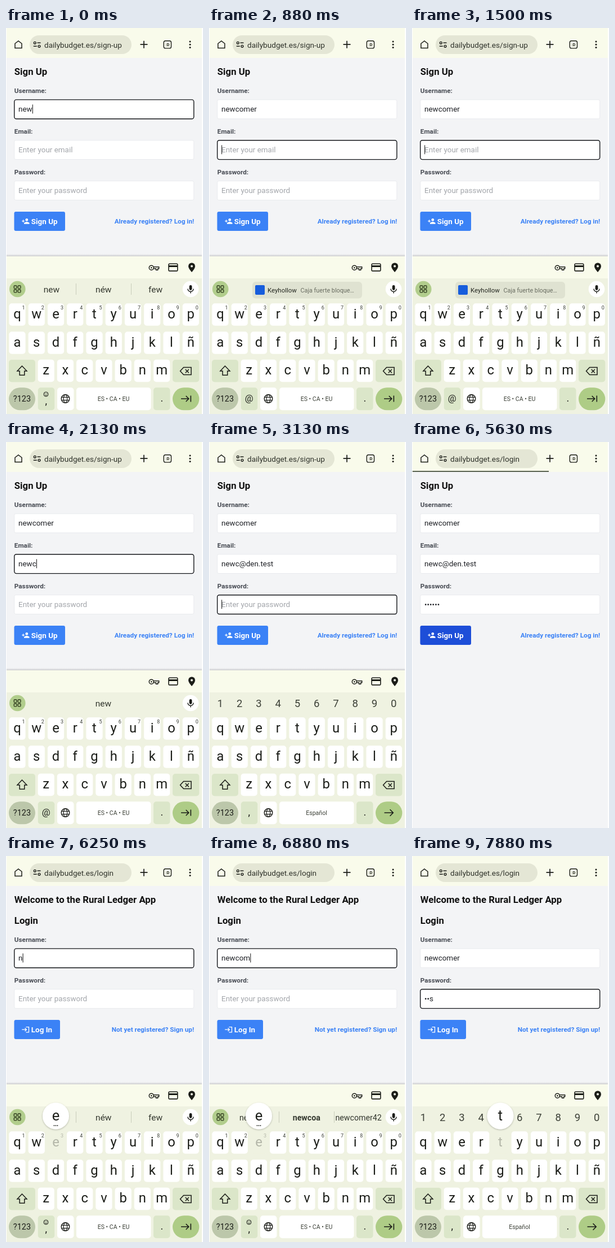
Write an HTML page that moves like this. It is 350 by 683 pixels and loops after 8 s.

```html
<!DOCTYPE html>
<html lang="en">
<head>
<meta charset="utf-8">
<title>Sign up and log in</title>
<style>
html, body { margin: 0; width: 100%; height: 100%; overflow: hidden; background: #fff; }
svg { display: block; width: 350px; height: 683px; font-family: Roboto, sans-serif; }
text { white-space: pre; }
</style>
</head>
<body>
<svg id="stage" viewBox="0 0 350 683"></svg>
<script>
const LOOP = 8000;
const INK = '#1b1d18', BAR = '#f9fbeb', BOARD = '#eff2e1', SOFT = '#dbe6c9', BLUE = '#3b82f6';
const NAME = 'newcomer', MAIL = 'newc@den.test', PASS = 'tester';

// Ticks (1/8 s) at which each character lands
const TYPED = {
  name: [-2, -1, 0, 2, 3, 4, 5, 6],
  mail: [14, 15, 16, 17, 18, 19, 20, 20, 21, 21, 22, 22, 23],
  pass: [30, 31, 32, 33, 35, 37],
  loginName: [50, 51, 52, 53, 54, 55, 56, 57],
  loginPass: [61, 62, 63, 64, 65, 66]
};
const KEYBOARD_DROP = { 39: 140, 49: 160 };
const CARET_OFF = [10, 11, 63];
const ROWS = [['qwertyuiop', 20, 507], ['asdfghjklñ', 20, 557], ['zxcvbnm', 71.2, 606.5]];
const PITCH = 34.25;

const stage = document.getElementById('stage');
const pen = document.createElement('canvas').getContext('2d');
const width = (s, size) => {
  pen.font = `${size}px Roboto, sans-serif`;
  return pen.measureText(s).width;
};

const rect = (x, y, w, h, fill, r = 0, extra = '') =>
  `<rect x="${x}" y="${y}" width="${w}" height="${h}" rx="${r}" fill="${fill}" ${extra}/>`;
const disc = (x, y, r, fill, extra = '') =>
  `<circle cx="${x}" cy="${y}" r="${r}" fill="${fill}" ${extra}/>`;
const ring = (x, y, r, w = 1.5, color = INK) =>
  disc(x, y, r, 'none', `stroke="${color}" stroke-width="${w}"`);
const line = (d, w = 1.6, color = INK) =>
  `<path d="${d}" fill="none" stroke="${color}" stroke-width="${w}"/>`;
const text = (x, y, s, size, fill = INK, { weight = 400, anchor = 'start' } = {}) =>
  `<text x="${x}" y="${y}" font-size="${size}" font-weight="${weight}" fill="${fill}" text-anchor="${anchor}">${s}</text>`;
const mid = (x, y, s, size, fill = INK, weight = 400) =>
  text(x, y, s, size, fill, { weight, anchor: 'middle' });
const bold = (x, y, s, size, fill, anchor = 'start') =>
  text(x, y, s, size, fill, { weight: 600, anchor });

function browserBar(url, progress) {
  return rect(1, 0, 347, 53, BAR)
    + line('M16 27.5 22 23 28 27.5V35.5H16Z', 1.5)
    + rect(42, 13, 181, 33, '#e4e6d5', 16.5)
    + ring(51.3, 26.3, 1.9, 1.4) + line('M55.5 26.3H61.5M48.8 32.3H54.8', 1.4) + ring(59, 32.3, 1.9, 1.4)
    + text(68, 34.5, 'dailybudget.es/' + url, 13.6, '#30332b')
    + line('M238.5 29.2H251.5M245 22.7V35.7', 1.7)
    + rect(280.3, 22.7, 13.2, 13.2, 'none', 3, `stroke="${INK}" stroke-width="1.4"`)
    + mid(287, 31.8, ':D', 7, INK, 700)
    + [24, 29.2, 34.4].map(y => disc(327, y, 1.5, INK)).join('')
    + (progress ? rect(1, 51, progress - 1, 2, '#5a6350') : '');
}

function field(y, label, value, hint, focused, caret) {
  const frame = focused ? 'stroke="#15171b" stroke-width="1.4"' : 'stroke="#e9ebee" stroke-width="1"';
  const base = y + 21.5;
  return bold(14.8, y - 11.8, label, 11.76, '#474b53')
    + rect(14.8, y, 318.9, 33.8, '#fff', focused ? 3.5 : 2.5, frame)
    + (value ? text(22, base, value, 13.44, '#1f2126') : text(22, base, hint, 13.44, '#a3a6ab'))
    + (focused && caret ? rect(22.2 + width(value, 13.44), base - 13, 1, 16, '#111') : '');
}

function actions(y, label, w, icon, link, pressed) {
  return rect(14.5, y, w, 34, pressed ? '#1d4ed8' : BLUE, 3) + icon
    + bold(44.8, y + 21.8, label, 13.44, '#fff')
    + bold(334.2, y + 21, link, 11.76, BLUE, 'end');
}

function signUpPage(s) {
  const icon = disc(36.8, 339.4, 2.4, '#fff')
    + '<path d="M32 346.8v-1.2c0-1.7 3-2.6 4.8-2.6s4.8.9 4.8 2.6v1.2z" fill="#fff"/>'
    + line('M28.3 341.6H33M30.6 339.2V344', 1.2, '#fff');
  return bold(14.8, 83.2, 'Sign Up', 16.8, '#111')
    + field(126.9, 'Username:', s.name, 'Enter your username', s.focus === 'name', s.caret)
    + field(198.8, 'Email:', s.mail, 'Enter your email', s.focus === 'mail', s.caret)
    + field(270.7, 'Password:', s.pass, 'Enter your password', s.focus === 'pass', s.caret)
    + actions(325, 'Sign Up', 90.5, icon, 'Already registered? Log in!', s.pressed);
}

function loginPage(s) {
  const icon = line('M28.3 307.2H36.3M33.6 304.4 36.4 307.2 33.6 310M35.5 302.6H40.5V311.8H35.5', 1.3, '#fff');
  return bold(14.8, 83.2, 'Welcome to the Rural Ledger App', 16.8, '#111')
    + bold(14.8, 120.2, 'Login', 16.8, '#111')
    + field(163.9, 'Username:', s.name, 'Enter your username', s.focus === 'loginName', s.caret)
    + field(235.8, 'Password:', s.pass, 'Enter your password', s.focus === 'loginPass', s.caret)
    + actions(290, 'Log In', 81.5, icon, 'Not yet registered? Sign up!', false);
}

function strip(s, secret, isMail) {
  if (secret)
    return [...'1234567890'].map((d, i) => mid(20 + PITCH * i, 468.5, d, 18.5, '#3c4037')).join('');
  const word = s.value;
  let body;
  if (!word) {
    body = rect(77, 449, 195, 29.5, '#dfe2d1', 6)
      + rect(82, 455, 17, 17, '#175ddc', 2)
      + text(104, 467.7, 'Keyhollow', 11.4, '#23261f')
      + text(162.5, 467.5, 'Caja fuerte bloque…', 10.8, '#686c60');
  } else if (isMail) {
    body = mid(173, 467.5, word.split(/[@.]/).pop().slice(0, -1), 15.5, '#34382f');
  } else {
    const long = word.length > 3;
    const words = long ? [word, word.slice(0, -1) + 'a', NAME + '42'] : [word, 'néw', 'few'];
    body = words.map((w, i) => mid(81 + 92.3 * i, 467.5, w, long ? 14.2 : 15.5, '#34382f', long && i === 1 ? 700 : 400)).join('')
      + line('M124.5 452V472M222.5 452V472', 1, '#c9cdbb');
  }
  const grid = [[14.2, 456], [21.2, 456], [14.2, 463], [21.2, 463]]
    .map(([x, y]) => rect(x, y, 4.8, 4.8, 'none', 1, 'stroke="#2e3a1c" stroke-width="1.3"')).join('');
  return body + disc(20.3, 462, 14.3, '#b1cd8c') + grid
    + disc(328, 462, 14.3, '#fff') + rect(325.6, 455, 4.8, 9, INK, 2.4)
    + line('M323 461.5a5 5 0 0 0 10 0M328 466.5V469.5', 1.4);
}

function letterKeys(held, secret) {
  let keys = '', popup = '';
  ROWS.forEach(([letters, x0, y], row) => [...letters].forEach((c, i) => {
    const x = x0 + PITCH * i, down = c === held;
    const tint = down ? '#b3b6a8' : INK;
    keys += rect(x - 14.6, y - 19.7, 29.2, 39.4, down ? BOARD : '#fff', 5)
      + mid(x, y + 6.5, c, 23.8, tint);
    if (!row && !secret) keys += mid(x + 11, y - 9, (i + 1) % 10, 9, down ? tint : '#3c4037');
    if (down) popup = disc(x, y - 47, 23.5, '#fff', 'filter="url(#lift)"')
      + mid(x, y - 39.5, c, 25.5)
      + (!row && !secret ? [-3, 0, 3].map(d => disc(x + d, y - 30, .9, INK)).join('') : '');
  }));
  return keys + popup;
}

function bottomKeys(secret, isMail) {
  const smile = ring(71, 648, 4, 1) + disc(69.5, 647, .7, INK) + disc(72.5, 647, .7, INK)
    + line('M69 649.3Q71 651.5 73 649.3', .9);
  const comma = isMail ? mid(71.2, 661, '@', 16.5)
    : secret ? mid(71.2, 661, ',', 18) : smile + mid(71.2, 666, ',', 18);
  return rect(5, 587, 47, 39.4, SOFT, 5) + line('M28.5 598 20 607H24.2V614.3H32.8V607H37Z', 1.5)
    + rect(296, 587, 47.3, 39.4, SOFT, 5)
    + line('M315.5 600.5H329V613.5H315.5L309.5 607ZM318.7 604 324.9 610.2M324.9 604 318.7 610.2', 1.5)
    + rect(5, 636.3, 47, 40, '#bcc7aa', 20) + mid(28.5, 661, '?123', 14.5)
    + rect(56.8, 636.3, 29.5, 40, SOFT, 5) + comma
    + rect(91, 636.3, 29.5, 40, '#fff', 5) + ring(105.5, 656, 7.3, 1.4)
    + '<ellipse cx="105.5" cy="656" rx="3.2" ry="7.3" fill="none" stroke="#1b1d18" stroke-width="1.2"/>'
    + line('M99 653.4H112M99 658.6H112', 1.2)
    + rect(125, 636.3, 132.5, 40, '#fff', 5)
    + mid(191, 659.7, secret ? 'Español' : 'ES • CA • EU', 10.6, '#3c4037')
    + rect(262, 636.3, 29.5, 40, SOFT, 5) + mid(276.8, 661, '.', 18)
    + rect(296, 636.3, 47.3, 40, '#aecc86', 20)
    + line(secret ? 'M311.5 656H327M321.5 650.3 327.2 656 321.5 661.7'
      : 'M311 656H324.5M319.7 651 324.7 656 319.7 661M328.3 650.5V661.5', 1.6);
}

function keyboard(s) {
  const secret = /pass/i.test(s.focus), isMail = s.focus === 'mail';
  return `<g transform="translate(0 ${s.drop})">`
    + rect(1, 400, 347, 4, 'url(#shade)') + rect(1, 404, 347, 40, BAR) + rect(1, 443, 347, 240, BOARD)
    + ring(258.3, 424.2, 4) + disc(258.3, 424.2, 1.2, INK)
    + line('M262.2 422.7H271.7V425.8H269.7V428.3H266.5V425.8H262.2', 1.4)
    + rect(289, 417.3, 15.8, 12.6, 'none', 1.5, `stroke="${INK}" stroke-width="1.6"`) + rect(289, 420, 15.8, 3, INK)
    + `<path d="M330 415.5a6 6 0 0 1 6 6c0 4.3-6 10.5-6 10.5s-6-6.2-6-10.5a6 6 0 0 1 6-6z" fill="${INK}"/>`
    + disc(330, 421.5, 2, BAR)
    + strip(s, secret, isMail) + bottomKeys(secret, isMail) + letterKeys(s.held, secret) + '</g>';
}

const DEFS = `<defs><linearGradient id="shade" x2="0" y2="1"><stop stop-color="#000" stop-opacity="0"/>
<stop offset="1" stop-color="#000" stop-opacity=".16"/></linearGradient>
<filter id="lift" x="-30%" y="-30%" width="160%" height="160%">
<feDropShadow dx="0" dy="1" stdDeviation="1.8" flood-opacity=".28"/></filter></defs>`;

function focusAt(k) {
  if (k < 7) return 'name';
  if (k < 25) return 'mail';
  if (k < 40) return 'pass';
  if (k < 49) return '';
  return k < 58 ? 'loginName' : 'loginPass';
}

function stateAt(k) {
  const focus = focusAt(k), login = k >= 47;
  const count = id => TYPED[id].filter(t => t <= k).length;
  const n = count(login ? 'loginPass' : 'pass');
  const lastShown = n && (login || k < 39);
  const pass = lastShown ? '•'.repeat(n - 1) + PASS[n - 1] : '•'.repeat(n);
  const name = NAME.slice(0, count(login ? 'loginName' : 'name'));
  const mail = MAIL.slice(0, count('mail'));
  const word = { name: NAME, loginName: NAME, mail: MAIL, pass: PASS, loginPass: PASS }[focus];
  const next = focus ? TYPED[focus].indexOf(k + 1) : -1;
  return {
    focus, login, name, mail, pass,
    value: focus === 'mail' ? mail : name,
    held: next < 0 ? '' : word[next],
    caret: !CARET_OFF.includes(k),
    pressed: k >= 43,
    drop: KEYBOARD_DROP[k] || 0,
    url: k >= 44 ? 'login' : 'sign-up',
    progress: k === 44 ? 120 : k === 45 || k === 46 ? 243 : 0
  };
}

function draw(k) {
  const s = stateAt(k);
  stage.innerHTML = DEFS + rect(1, 53, 347, 630, '#f3f4f6')
    + browserBar(s.url, s.progress)
    + (s.login ? loginPage(s) : signUpPage(s))
    + (s.focus ? keyboard(s) : '');
}

let shown = -1;
function play(now) {
  const t = now % LOOP;
  // Odd ticks land on whole hundredths: 0, 130, 250, 380 ...
  const k = Math.floor(t / 250) * 2 + (t % 250 >= 130 ? 1 : 0);
  if (k !== shown) draw(shown = k);
  requestAnimationFrame(play);
}
draw(0);
requestAnimationFrame(play);
</script>
</body>
</html>
```
